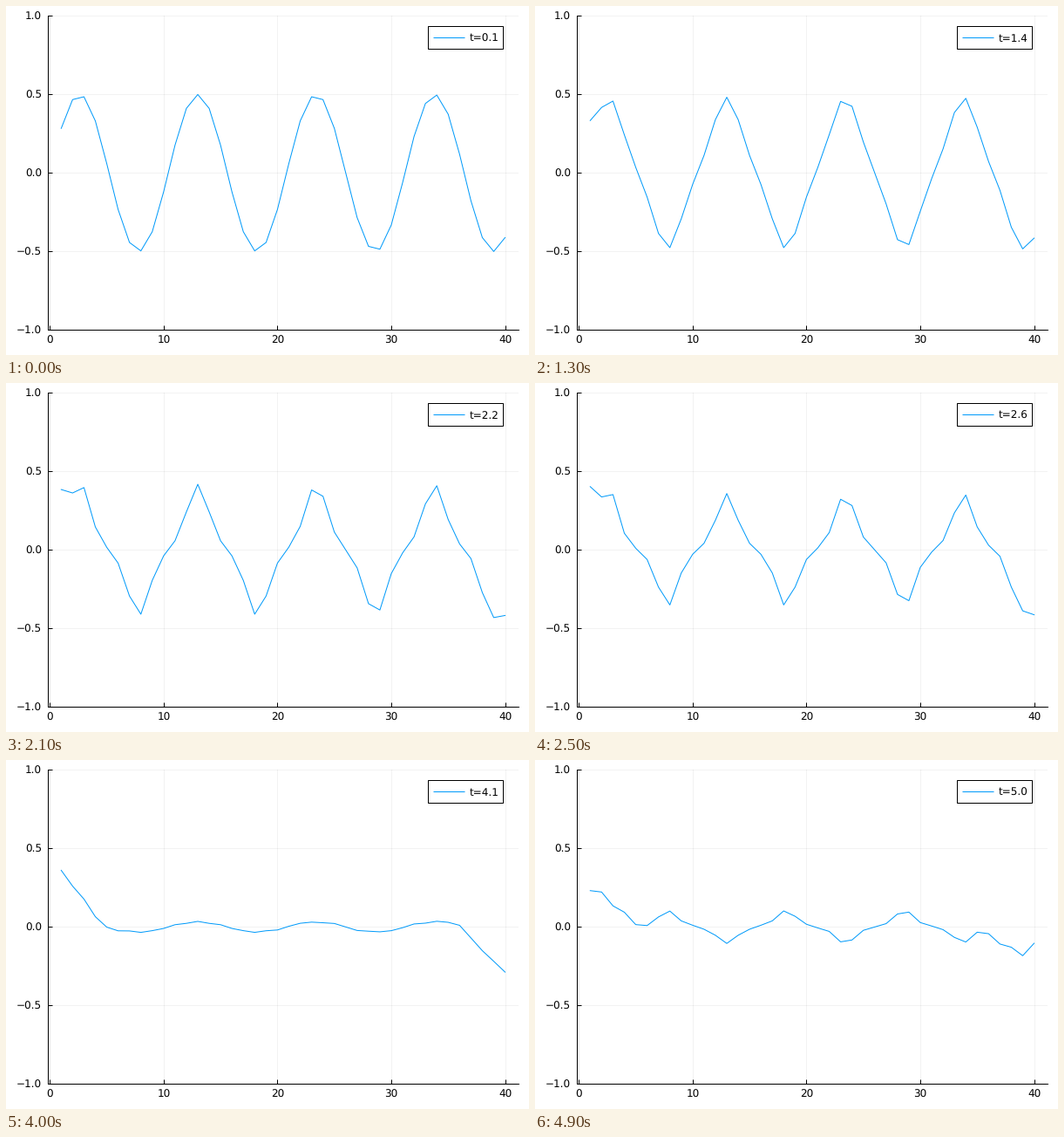
Write a matplotlib script that moves like this. It is 600 by 400 pixels and loops after 5000 ms.

```python
import numpy as np
import matplotlib.pyplot as plt
from matplotlib.animation import FuncAnimation
from matplotlib.patches import Rectangle

WIDTH, HEIGHT, DPI = 600, 400, 100
SITES, FRAMES, STEP = 40, 50, 0.1
WAVE = 5 * np.pi / 26
BLUE = "#009afa"
PX = 72 / DPI  # one pixel in points

plt.rcParams.update({"font.family": "DejaVu Sans", "font.size": 11.8 * PX,
                     "text.hinting": "none", "text.hinting_factor": 1})

# Spin helix on an open XX chain, solved as free fermions.
sites = np.arange(1, SITES + 1)
spin_x = 0.5 * np.cos(WAVE * sites)
spin_z = 0.5 * np.sin(WAVE * sites)


def initial_correlations():
    """<c_i^+ c_j> of the product state, with its Jordan-Wigner strings."""
    corr = np.diag(spin_z + 0.5)
    for i in range(SITES):
        for j in range(i + 1, SITES):
            string = np.prod(-2 * spin_z[i + 1:j])
            corr[i, j] = corr[j, i] = spin_x[i] * string * spin_x[j]
    return corr


hopping = 0.5 * (np.eye(SITES, k=1) + np.eye(SITES, k=-1))
energies, modes = np.linalg.eigh(hopping)
correlations = initial_correlations()


def magnetization(time):
    u = (modes * np.exp(-1j * energies * time)) @ modes.T
    density = np.einsum("ij,jk,ik->i", u.conj(), correlations, u, optimize=True)
    return density.real - 0.5


fig = plt.figure(figsize=(WIDTH / DPI, HEIGHT / DPI), dpi=DPI, facecolor="white")

# Plot area
left, right, top, bottom = 48.05, 587.85, 11.45, 371.3
ax = fig.add_axes([left / WIDTH, 1 - bottom / HEIGHT,
                   (right - left) / WIDTH, (bottom - top) / HEIGHT])
ax.set(xlim=(-0.17, 41.17), ylim=(-1, 1),
       xticks=range(0, 41, 10), yticks=np.arange(-1, 1.1, 0.5))
ax.set_axisbelow(True)
ax.grid(color="black", alpha=0.05, lw=PX)
ax.spines[["top", "right"]].set_visible(False)
for side in ("left", "bottom"):
    ax.spines[side].set_linewidth(PX)
ax.tick_params(direction="in", length=5 * PX, width=PX)
ax.tick_params(axis="x", pad=6.5 * PX)
ax.tick_params(axis="y", pad=7.2 * PX)
curve, = ax.plot([], [], color=BLUE, lw=PX)

# Legend, laid out in pixels
overlay = fig.add_axes([0, 0, 1, 1])
overlay.set(xlim=(0, WIDTH), ylim=(HEIGHT, 0))
overlay.axis("off")
overlay.add_patch(Rectangle((484, 23.4), 86, 26, fc="white", ec="black", lw=PX))
overlay.plot([490, 526], [36.4, 36.4], color=BLUE, lw=PX, solid_capstyle="butt")
label = overlay.text(531.2, 40.9, "", va="baseline")


def update(frame):
    curve.set_data(sites, magnetization(frame * STEP))
    label.set_text(f"t={(frame + 1) * STEP:.1f}")
    return curve, label


anim = FuncAnimation(fig, update, frames=FRAMES, interval=100,
                     repeat=True, repeat_delay=0)
plt.show()
```
